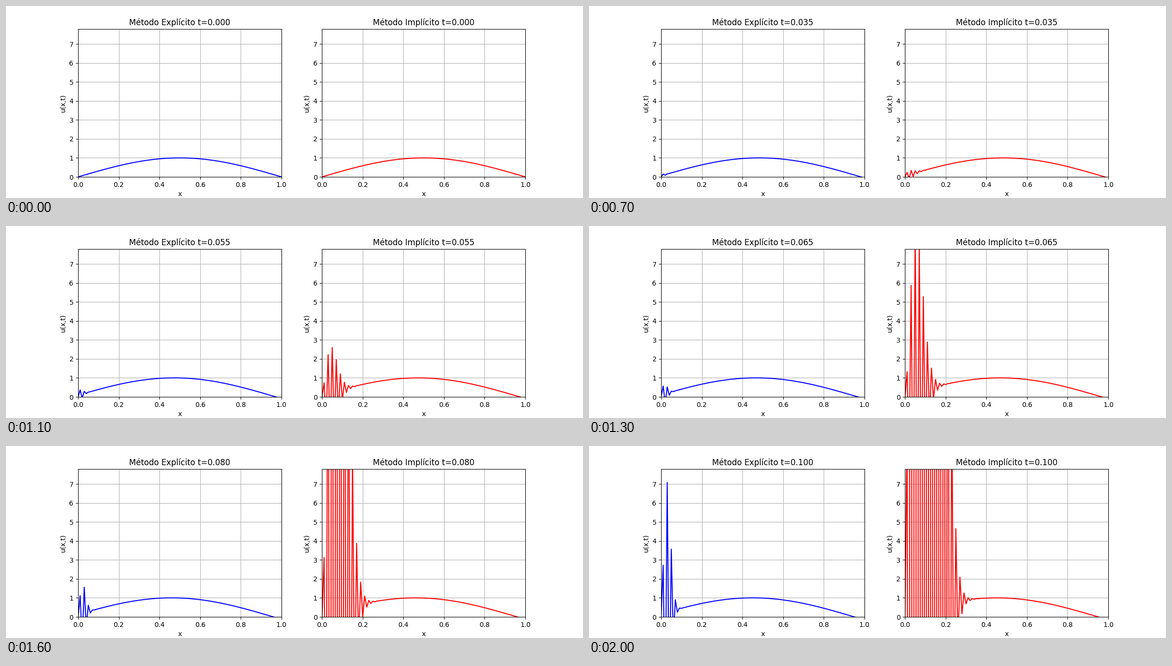
Recreate the animation shown at these times as a matplotlib script. Size 1200 by 400 pixels, loop 2100 ms.

```python
import numpy as np
import matplotlib.pyplot as plt
from matplotlib.animation import FuncAnimation

# Advection u_t + A u_x = 0, backward difference in space
A = -0.5
DX, DT = 0.01, 0.005
STEPS = 20
C = A * DT / DX

x = np.linspace(0, 1, 101)


def explicit_step(u):
    new = u.copy()
    new[1:] = u[1:] - C * (u[1:] - u[:-1])
    return new


def implicit_step(u):
    new = u.copy()
    for i in range(1, len(u)):
        new[i] = (u[i] + C * new[i - 1]) / (1 + C)
    return new


def solve(step):
    states = [np.sin(np.pi * x)]
    for _ in range(STEPS):
        states.append(step(states[-1]))
    return np.array(states)


explicit = solve(explicit_step)
implicit = solve(implicit_step)
y_max = 1.1 * explicit.max()

fig, axes = plt.subplots(1, 2, figsize=(12, 4), dpi=100)
panels = []
for ax, name, states, color in (
    (axes[0], "Método Explícito", explicit, "blue"),
    (axes[1], "Método Implícito", implicit, "red"),
):
    line, = ax.plot(x, states[0], color=color)
    ax.set_xlim(0, 1)
    ax.set_ylim(0, y_max)
    ax.set_xlabel("x")
    ax.set_ylabel("u(x,t)")
    ax.grid(True)
    panels.append((ax, name, states, line))


def update(n):
    for ax, name, states, line in panels:
        line.set_ydata(states[n])
        ax.set_title(f"{name} t={n * DT:.3f}")
    return [panel[3] for panel in panels]


anim = FuncAnimation(fig, update, frames=STEPS + 1, interval=100,
                     repeat=True, repeat_delay=0, blit=False)
plt.show()
```
